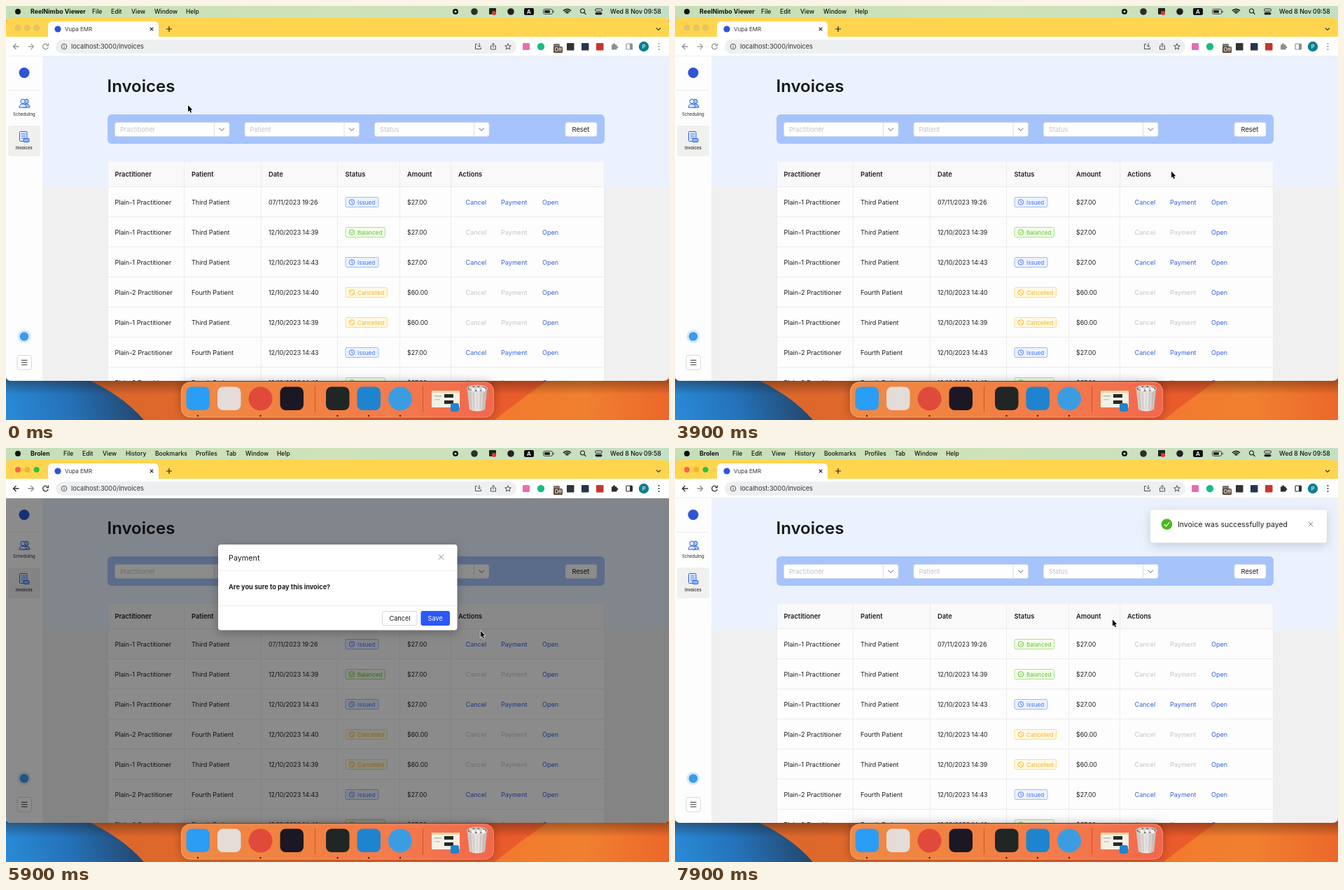
An HTML page with a canvas that plays this animation: 947 by 592 pixels, repeating every 8000 ms.

```html
<!DOCTYPE html>
<html lang="en">
<head>
<meta charset="utf-8">
<title>Invoices</title>
<style>
html, body { margin: 0; width: 100%; height: 100%; overflow: hidden; background: #e9652b; }
canvas { display: block; width: 947px; height: 592px; }
</style>
</head>
<body>
<canvas id="stage"></canvas>
<script>
const W = 947, H = 592, LOOP = 8000;
const canvas = document.getElementById('stage');
const c = canvas.getContext('2d');
const dpr = window.devicePixelRatio || 1;
canvas.width = W * dpr;
canvas.height = H * dpr;

const INK = '#1c1c1e', BLUE = '#3560e0', PALE = '#c3c4c6';
const T = { active: 4550, open: 5250, save: 6600, load: 6750, done: 7400, toast: 7450 };

// Cursor stops: time, x, y
const PATH = [[0, 260, 142], [1600, 412, 130], [3900, 709, 236.5], [4500, 718, 279],
  [5300, 718, 279], [5900, 678, 261.5], [6450, 625, 245.5], [8000, 625, 245.5]];

const clamp = v => Math.max(0, Math.min(1, v));
const ease = v => 1 - Math.pow(1 - clamp(v), 3);

function text(s, x, y, size, color = INK, weight = 400) {
  c.font = `${weight} ${size}px Inter, "Open Sans", sans-serif`;
  c.fillStyle = color;
  c.fillText(s, x, y + size * 0.36);
  return c.measureText(s).width;
}

function box(x, y, w, h, r, fill, stroke, lw = 1) {
  c.beginPath();
  c.roundRect(x, y, w, h, r);
  if (fill) { c.fillStyle = fill; c.fill(); }
  if (stroke) { c.strokeStyle = stroke; c.lineWidth = lw; c.stroke(); }
}

function dot(x, y, r, fill, stroke, lw = 1) {
  c.beginPath();
  c.arc(x, y, r, 0, 7);
  if (fill) { c.fillStyle = fill; c.fill(); }
  if (stroke) { c.strokeStyle = stroke; c.lineWidth = lw; c.stroke(); }
}

function line(color, lw, ...p) {
  c.beginPath();
  c.moveTo(p[0], p[1]);
  for (let i = 2; i < p.length; i += 2) c.lineTo(p[i], p[i + 1]);
  c.strokeStyle = color;
  c.lineWidth = lw;
  c.stroke();
}

function cross(x, y, r, color, lw = 1) {
  line(color, lw, x - r, y - r, x + r, y + r);
  line(color, lw, x + r, y - r, x - r, y + r);
}

const chevron = (x, y, r, color) => line(color, 1.1, x - r, y - r / 2, x, y + r / 2, x + r, y - r / 2);

function ramp(x0, y0, x1, y1, ...colors) {
  const g = c.createLinearGradient(x0, y0, x1, y1);
  colors.forEach((v, i) => g.addColorStop(i / (colors.length - 1), v));
  return g;
}

function shadow(color, blur, dy) {
  c.shadowColor = color;
  c.shadowBlur = blur * dpr;
  c.shadowOffsetY = dy * dpr;
}

function wallpaper() {
  c.fillStyle = ramp(110, 0, W, 0, '#d9682c', '#e8672b', '#ea5a2b', '#e9602b');
  c.fillRect(0, 530, W, 62);
  c.fillStyle = ramp(700, 560, W, 592, '#f2792d', '#f08030', '#ec672a');
  c.beginPath();
  c.moveTo(782, 530);
  c.quadraticCurveTo(735, 562, 698, 592);
  c.lineTo(W, 592);
  c.lineTo(W, 530);
  c.fill();
  c.fillStyle = ramp(0, 590, 180, 540, '#2a8bd8', '#2471b8', '#24486f');
  c.beginPath();
  c.moveTo(0, 530);
  c.lineTo(108, 530);
  c.quadraticCurveTo(165, 555, 197, 592);
  c.lineTo(0, 592);
  c.fill();
  c.fillStyle = ramp(0, 534, 0, 556, 'rgba(30,10,0,.38)', 'rgba(30,10,0,0)');
  c.fillRect(0, 534, W, 22);
}

function menuBar(active) {
  c.fillStyle = ramp(0, 0, W, 0, '#c5dfb9', '#cfe2b8', '#c3dfc4');
  c.fillRect(0, 0, W, 20);
  dot(17, 8, 4, '#111');
  const items = active
    ? [['File', 82], ['Edit', 109], ['View', 138], ['History', 171], ['Bookmarks', 213],
       ['Profiles', 271], ['Tab', 314], ['Window', 342], ['Help', 387]]
    : [['File', 123], ['Edit', 150], ['View', 179], ['Window', 212], ['Help', 257]];
  text(active ? 'Brolen' : 'ReelNimbo Viewer', 35, 8, 8.8, '#111', 700);
  for (const [s, x] of items) text(s, x, 8, 8.5, '#111', 500);

  dot(642, 8, 4, '#111');
  dot(642, 8, 1.6, '#d6e5c6');
  dot(669, 8, 4.8, '#2b2f2a');
  box(690, 3, 10, 9, 1, '#222');
  dot(697, 10, 3, '#e5372c');
  dot(721, 8, 4.8, '#222');
  box(740, 3, 14, 10, 2, '#111');
  text('A', 744, 8, 8, '#fff', 600);
  box(767.5, 4.5, 13, 7, 2, null, '#333', 0.9);
  box(769, 6, 8, 4, 1, '#222');
  box(781.5, 6.5, 1.2, 3, 0.6, '#333');
  for (const r of [2.5, 5, 7.5]) {
    c.beginPath();
    c.arc(801.5, 12, r, -Math.PI * 0.76, -Math.PI * 0.24);
    c.strokeStyle = '#111';
    c.lineWidth = 1.5;
    c.stroke();
  }
  dot(823.5, 7, 3, null, '#222', 1.1);
  line('#222', 1.2, 825.8, 9.3, 828.5, 12);
  box(841.5, 4, 10, 3.4, 1.7, null, '#222');
  box(841.5, 9, 10, 3.4, 1.7, '#222');
  text('Wed 8 Nov', 863, 8, 8.8, '#111', 500);
  text('09:58', 911, 8, 8.8, '#111', 500);
}

function arrowIcon(x, y, dir, color) {
  line(color, 1.3, x - 4 * dir, y, x + 4 * dir, y);
  line(color, 1.3, x, y - 4, x + 4 * dir, y, x, y + 4);
}

function browser(active) {
  const tone = active ? '#2c2e31' : '#8d8f92';
  box(0, 17, W, 40, [7, 7, 0, 0], '#ffd550');
  const lights = active ? ['#ff5f52', '#f7b32a', '#2fc140'] : Array(3).fill('#e6c568');
  lights.forEach((v, i) => dot(17 + i * 13.3, 31, 4, v, active ? null : '#d6b75f', 0.6));
  box(60, 22, 158, 30, 6, '#fff');
  dot(74, 33, 4.6, '#2f55d4');
  text('Vupa EMR', 84, 33, 8, '#333');
  cross(208, 33, 2.3, '#222', 1.1);
  line('#222', 1.2, 229, 33, 237, 33);
  line('#222', 1.2, 233, 29, 233, 37);
  chevron(932, 33, 3, '#333');

  c.fillStyle = '#fff';
  c.fillRect(0, 44, W, 28);
  arrowIcon(14.5, 58, -1, tone);
  arrowIcon(35.5, 58, 1, active ? '#8b8d90' : '#a3a5a7');
  c.beginPath();
  c.arc(56.5, 58, 3.8, 0.2, 5.3);
  c.strokeStyle = tone;
  c.lineWidth = 1.3;
  c.stroke();
  line(tone, 1.3, 60.5, 53.5, 60.5, 56.5, 57.5, 56.5);

  box(71, 48, 658, 20, 10, '#eeeff0');
  dot(83, 58, 3.8, null, '#55585c', 1);
  line('#55585c', 1, 83, 57.4, 83, 60);
  dot(83, 56, 0.6, '#55585c');
  text('localhost:3000/invoices', 93, 58, 9.2, '#2d3033');
  line('#4c4f53', 1, 673, 54.5, 670.5, 54.5, 670.5, 61.5, 678.5, 61.5, 678.5, 59);
  line('#4c4f53', 1, 676, 53, 676, 58.5);
  line('#4c4f53', 1, 674, 56.5, 676, 58.5, 678, 56.5);
  line('#4c4f53', 1, 694.5, 57, 692.5, 57, 692.5, 62, 699.5, 62, 699.5, 57, 697.5, 57);
  line('#4c4f53', 1, 694, 55.4, 696, 53.4, 698, 55.4);
  line('#4c4f53', 1, 696, 53.5, 696, 59.5);
  c.beginPath();
  for (let i = 0; i < 10; i++) {
    const r = i % 2 ? 2 : 4.6, a = i * Math.PI / 5 - Math.PI / 2;
    c.lineTo(717 + r * Math.cos(a), 58.3 + r * Math.sin(a));
  }
  c.closePath();
  c.stroke();

  box(738, 53, 10, 10, 1.5, '#e56fb0');
  dot(764, 58, 5.2, '#18bd82');
  box(782, 54, 9, 7, 1, '#777');
  box(782, 58, 13, 9, 1.5, '#5d4a37');
  text('Off', 783.5, 62.5, 7.2, '#fff', 500);
  box(801, 53, 10.5, 10.5, 1, '#303438');
  box(822, 53, 10.5, 10.5, 1, '#26364f');
  box(843, 53, 10.5, 10.5, 1, '#c8352f');
  box(865, 55.2, 7.5, 7.3, 0.8, tone);
  dot(868.6, 54.8, 1.6, tone);
  dot(872.8, 58.8, 1.6, tone);
  box(886, 54, 8.5, 8, 1, null, tone, 1.2);
  box(891, 54, 3.5, 8, 0, tone);
  dot(911, 58, 7.2, '#087f8d');
  text('P', 908.7, 58, 7.6, '#fff', 500);
  for (const y of [54, 58, 62]) dot(932.5, y, 1, tone);
  c.fillStyle = '#e4e5e6';
  c.fillRect(0, 71.4, W, 0.8);
}

function person(x, y, fill) {
  c.beginPath();
  c.moveTo(x - 5, y + 6.5);
  c.quadraticCurveTo(x - 4.5, y + 1.5, x, y + 1.5);
  c.quadraticCurveTo(x + 4.5, y + 1.5, x + 5, y + 6.5);
  c.closePath();
  c.fillStyle = fill;
  c.fill();
  c.strokeStyle = BLUE;
  c.lineWidth = 1;
  c.stroke();
  dot(x, y - 2.2, 3.2, fill, BLUE);
}

function sidebar() {
  c.fillStyle = '#fdfdfd';
  c.fillRect(0, 72, 52, 464);
  dot(26, 95.5, 7.5, '#2f55d4');
  line('#eeeee6', 1, 3, 120.5, 49, 120.5);
  person(29, 138.6, '#9fc5fa');
  person(24, 138.6, '#dcebff');
  text('Scheduling', 10, 155, 6, '#222');
  box(3, 171, 46, 44, 4, '#f0f0ef');
  box(19.5, 179.5, 10.5, 14, 1, '#dcebff', BLUE);
  for (const y of [183, 186, 189]) line(BLUE, 0.9, 22, y, 28, y);
  box(25, 189.5, 8, 5, 1, '#8ab8f8', BLUE);
  text('Invoices', 14, 203, 6, '#222', 500);
  dot(26, 472.5, 9.5, '#d5e8fa');
  dot(26, 472.5, 6.3, '#3d9be6');
  box(16, 499.5, 20.5, 20.5, 3, '#fff', '#d8d8d8');
  for (const y of [506.5, 509.7, 513]) line('#333', 1, 22, y, 30.5, y);
}

function filters() {
  box(145, 155, 710, 42, 6, '#a6c3fb');
  ['Practitioner', 'Patient', 'Status'].forEach((s, i) => {
    const x = 155.5 + i * 185.5;
    box(x, 166.5, 163.5, 20, 3, '#fff', '#d3dcec', 0.8);
    line('#d6d9df', 0.9, x + 142, 166.5, x + 142, 186.5);
    text(s, x + 7.5, 176.5, 9.2, '#c0c2c6');
    chevron(x + 152.7, 176.5, 3.6, '#85888e');
  });
  box(799, 166.5, 45, 20, 3, '#fff', '#d3dcec', 0.8);
  text('Reset', 808.5, 176.5, 9.4);
}

const TAGS = {
  Issued: [47, '#ebf2ff', '#94b5fa', '#416fee'],
  Balanced: [56.5, '#f3fdea', '#a4df80', '#5cc22c'],
  Cancelled: [59.5, '#fff9e3', '#ffd879', '#f4b02b']
};

function tag(name, x, y) {
  const [w, fill, edge, color] = TAGS[name];
  box(x, y - 7, w, 14, 2, fill, edge, 0.9);
  dot(x + 9, y, 3.8, null, color, 0.9);
  if (name === 'Issued') line(color, 0.9, x + 9, y - 2.3, x + 9, y + 0.3, x + 10.8, y + 1.2);
  else if (name === 'Balanced') line(color, 0.9, x + 7.2, y, x + 8.6, y + 1.5, x + 11, y - 1.4);
  else line(color, 0.9, x + 6.4, y - 2.6, x + 11.6, y + 2.6);
  text(name, x + 17, y + 0.3, 8.1, color);
}

// Row: practitioner number, patient, date, status, amount
const ROWS = [
  [1, 'Third', '07/11/2023 19:26', 'Issued', 27],
  [1, 'Third', '12/10/2023 14:39', 'Balanced', 27],
  [1, 'Third', '12/10/2023 14:43', 'Issued', 27],
  [2, 'Fourth', '12/10/2023 14:40', 'Cancelled', 60],
  [1, 'Third', '12/10/2023 14:39', 'Cancelled', 60],
  [2, 'Fourth', '12/10/2023 14:43', 'Issued', 27],
  [2, 'Fourth', '12/10/2023 14:40', 'Balanced', 27]
];
const COLS = [['Practitioner', 155.5], ['Patient', 265], ['Date', 375], ['Status', 484.5],
  ['Amount', 573], ['Actions', 646]];

function table(paid, hoverRow, hoverLink) {
  box(145, 223, 710, 330, [4, 4, 0, 0], '#fdfdfd');
  box(145, 223, 710, 36, [4, 4, 0, 0], '#f9f9f9');
  for (const [s, x] of COLS) text(s, x, 240.5, 9.3, INK, 600);
  ROWS.forEach(([n, who, date, status, sum], i) => {
    const top = 258.5 + i * 43, y = top + 22;
    if (hoverRow && i === 0) { c.fillStyle = '#f8f8f8'; c.fillRect(145, top, 710, 43); }
    line('#ebebee', 1, 145, top, 855, top);
    if (paid && i === 0) status = 'Balanced';
    text(`Plain-${n} Practitioner`, 155.5, y, 9.1);
    text(`${who} Patient`, 265, y, 9.1);
    text(date, 375, y, 8.8);
    tag(status, 485, y);
    text(`$${sum}.00`, 573, y, 8.8);
    const on = status === 'Issued' ? BLUE : PALE;
    text('Cancel', 656.5, y, 9.1, on);
    text('Payment', 707, y, 9.1, hoverLink && i === 0 ? '#7f9ff2' : on);
    text('Open', 766, y, 9.1, BLUE);
  });
  for (const x of [145.5, 254.5, 364.5, 473.5, 562.5, 635.5, 854.5]) line('#ececef', 1, x, 223, x, 540);
}

function loading(t) {
  const a = (t - 7000) / 1000 * Math.PI * 2;
  c.beginPath();
  c.arc(500.3, 250, 7, a - 1, a + 0.65);
  c.strokeStyle = BLUE;
  c.lineWidth = 1.3;
  c.stroke();
  const grey = '#8b8b8b';
  text('Made with', 434, 515.5, 9.2, grey);
  c.fillStyle = '#e3262e';
  c.beginPath();
  c.moveTo(484.5, 520);
  c.bezierCurveTo(476, 514, 481, 508.5, 484.5, 513);
  c.bezierCurveTo(488, 508.5, 493, 514, 484.5, 520);
  c.fill();
  text('by', 491.3, 515.5, 9.2, grey);
  const w = text('Vupa Software', 503, 515.5, 9.2, grey);
  line(grey, 0.8, 503, 520.5, 503 + w, 520.5);
}

function modal(k) {
  if (k <= 0) return;
  c.fillStyle = `rgba(0,0,0,${0.45 * k})`;
  c.fillRect(0, 72, W, 464);
  c.save();
  c.globalAlpha = k;
  const s = 0.2 + 0.8 * k;
  c.translate(718 * (1 - s), 279 * (1 - s));
  c.scale(s, s);
  shadow('rgba(0,0,0,.25)', 14, 4);
  box(303, 138, 341.5, 122.5, 4, '#fff');
  shadow('transparent', 0, 0);
  text('Payment', 318, 157, 10.8);
  cross(621.5, 156, 3.6, '#85878a', 1);
  line('#ededee', 1, 303, 175.5, 644, 175.5);
  text('Are you sure to pay this invoice?', 318, 199, 9.2, INK, 700);
  line('#ededee', 1, 303, 225.5, 644, 225.5);
  box(537.5, 233.5, 49.5, 20, 3, '#fff', '#d6d6d8');
  text('Cancel', 547.5, 243.5, 9.2);
  box(592.5, 233, 41.5, 21, 3, '#2c58f5');
  text('Save', 602.5, 243.5, 9.2, '#fff');
  c.restore();
}

function toast(k) {
  if (k <= 0) return;
  c.save();
  c.globalAlpha = k;
  c.translate((1 - k) * 268, 0);
  shadow('rgba(0,0,0,.16)', 14, 4);
  box(679, 88.5, 252, 47, 4, '#fff');
  shadow('transparent', 0, 0);
  dot(702.5, 109, 7.8, '#47b91d');
  line('#fff', 1.4, 699, 109.2, 701.6, 111.8, 706.2, 106.4);
  text('Invoice was successfully payed', 718, 109.5, 10.5);
  cross(908, 109, 3.2, '#85878a', 1);
  c.restore();
}

function dock() {
  shadow('rgba(0,0,0,.3)', 14, 0);
  box(250, 537.5, 447, 51, 13, ramp(250, 0, 697, 0, '#f08a47', '#f0823f', '#f47b4c', '#f2674d'));
  shadow('transparent', 0, 0);
  box(250.5, 538, 446, 50, 13, null, 'rgba(255,220,190,.4)', 0.8);
  const tile = (x, color) => box(x, 544.5, 33.5, 33.5, 8, color);
  tile(257.5, '#2a9df4');
  tile(302, '#e4dcd8');
  dot(363.5, 561.5, 17, '#e04a3a');
  tile(391.5, '#1c1724');
  tile(457, '#1f2624');
  tile(501.5, '#1f84cf');
  dot(563, 561.5, 17, '#3c9ce2');
  for (const x of [441.5, 595.5]) line('rgba(150,55,20,.5)', 1, x, 544, x, 581);
  for (const x of [274, 363.5, 473.5, 518, 563]) dot(x, 586, 1.2, '#4a1c0c');

  box(608, 550, 40, 24, 1, '#f3f0e6');
  box(608, 550, 40, 3, 1, '#e7d9a8');
  box(626, 555, 13, 5, 0, '#26282a');
  box(626, 564, 13, 5, 0, '#26282a');
  box(612, 557, 10, 1.5, 0, '#b8b6ae');
  box(612, 562, 8, 1.5, 0, '#c8c6be');
  box(635, 568, 12, 12, 3, '#1f84cf');

  c.beginPath();
  c.moveTo(658.5, 546);
  c.lineTo(687.5, 546);
  c.lineTo(684, 577);
  c.quadraticCurveTo(673, 582, 662, 577);
  c.closePath();
  c.fillStyle = ramp(658, 0, 688, 0, '#c9c1bd', '#ece8e5', '#bdb4af');
  c.fill();
  for (let i = 0; i < 5; i++) line('rgba(130,115,110,.35)', 0.8, 663 + i * 5, 553, 665 + i * 4, 577);
  c.beginPath();
  c.ellipse(673, 547, 14.5, 4.5, 0, 0, 7);
  c.fillStyle = '#77706d';
  c.fill();
  c.strokeStyle = '#e9e5e2';
  c.lineWidth = 1;
  c.stroke();
  for (let i = 0; i < 6; i++) dot(664 + i * 3.6, 546 + (i % 2) * 2.2, 2.8, i % 2 ? '#f5f3f1' : '#d4cfcc');
}

function shape(points) {
  c.beginPath();
  for (let i = 0; i < points.length; i += 2) c.lineTo(points[i], points[i + 1]);
  c.closePath();
}

function cursor(x, y, hand) {
  c.save();
  c.translate(x, y);
  c.lineJoin = 'round';
  if (hand) {
    shape([-1.6, 0.3, -0.6, -0.3, 0.3, 0.3, 0.8, 4, 4, 4.6, 5.6, 6, 5.2, 9, 4.4, 11, -0.6, 11, -3.8, 6.8, -2.8, 6, -1, 7]);
    c.fillStyle = '#fff';
    c.strokeStyle = '#111';
    c.lineWidth = 1;
    c.fill();
    c.stroke();
    for (const k of [1, 2.5, 4]) line('#333', 0.6, k, 7, k, 9);
  } else {
    shape([0, 0, 0, 9.2, 2, 7.3, 3.5, 10.7, 5, 10, 3.6, 6.8, 6.3, 6.6]);
    c.strokeStyle = '#fff';
    c.lineWidth = 1.4;
    c.stroke();
    c.fillStyle = '#000';
    c.fill();
  }
  c.restore();
}

function pointer(t) {
  let i = 0;
  while (i < PATH.length - 2 && t >= PATH[i + 1][0]) i++;
  const [t0, x0, y0] = PATH[i], [t1, x1, y1] = PATH[i + 1];
  const k = clamp((t - t0) / (t1 - t0));
  return [x0 + (x1 - x0) * k, y0 + (y1 - y0) * k];
}

function draw(t) {
  const active = t >= T.active;
  const [mx, my] = pointer(t);
  const dialog = t >= T.open && t < T.save;
  const busy = t >= T.load && t < T.done;
  const onLink = active && t < T.open && mx > 705 && mx < 747 && my > 272;
  const onSave = dialog && mx > 592 && mx < 634 && my > 233 && my < 254;
  const onRow = active && t < T.save && my > 259;

  c.setTransform(dpr, 0, 0, dpr, 0, 0);
  c.textBaseline = 'alphabetic';
  wallpaper();
  menuBar(active);

  c.save();
  c.beginPath();
  c.roundRect(0, 17, W, 519, 7);
  c.clip();
  c.fillStyle = '#f0f0f0';
  c.fillRect(0, 72, W, 464);
  c.fillStyle = '#ebf2fe';
  c.fillRect(52, 72, W - 52, 187);
  browser(active);
  sidebar();
  text('Invoices', 144.5, 114.5, 24, '#17181a', 600);
  filters();
  if (busy) loading(t);
  else table(t >= T.done, onRow, onLink);
  const fade = t < T.save ? ease((t - T.open) / 250) : 1 - ease((t - T.save) / 200);
  modal(fade);
  toast(ease((t - T.toast) / 300));
  c.restore();

  dock();
  cursor(mx, my, onLink || onSave);
}

const start = performance.now();
function frame() {
  draw((performance.now() - start) % LOOP);
  requestAnimationFrame(frame);
}
frame();
</script>
</body>
</html>
```
